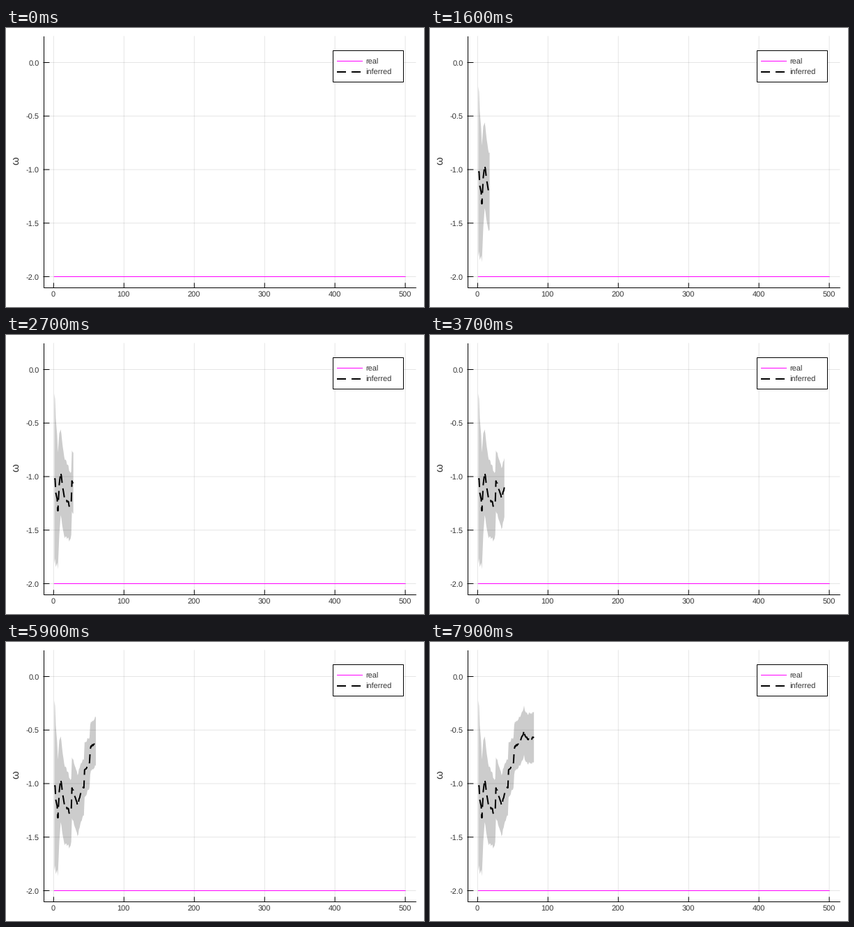
Animation of 600x400 px, one loop 8000 ms. Source, as a matplotlib script:

```python
import matplotlib.pyplot as plt
import numpy as np
from matplotlib.animation import FuncAnimation
from matplotlib.patches import Polygon, Rectangle

W, H, DPI = 600, 400, 100
PT = 72 / DPI
LEFT, RIGHT, TOP, BOTTOM = 53.9, 588, 12, 371.9
STEPS = 80

plt.rcParams["font.family"] = "Liberation Sans"
plt.rcParams["text.hinting"] = "none"


def sx(x):
    return 68.4 + 1.0094 * np.asarray(x)


def sy(y):
    return 49.5 - 153.5 * np.asarray(y)


# inferred mean: turning points joined by straight runs, plus a slight jitter
TURNS = [(1, -1.02), (2, -1.02), (3, -1.15), (5, -1.21), (6, -1.32),
         (8, -1.07), (10, -0.96), (15, -1.20), (21, -1.24), (22, -1.29),
         (25, -1.25), (26, -1.04), (30, -1.11), (34, -1.21), (39, -1.08),
         (43, -1.03), (44, -0.87), (51, -0.81), (52, -0.67), (62, -0.59),
         (66, -0.51), (69, -0.58), (80, -0.57)]
# half-width of the band, narrowing as steps come in
SPREAD = [(1, 0.795), (6, 0.545), (10, 0.40), (22, 0.33), (26, 0.285),
          (35, 0.285), (54, 0.225), (80, 0.235)]

steps = np.arange(1, STEPS + 1)
rng = np.random.default_rng(4)
jitter = np.where(steps > 10, rng.uniform(-0.015, 0.015, STEPS), 0)
mean = np.interp(steps, *zip(*TURNS)) + jitter
half = np.interp(steps, *zip(*SPREAD))

px = sx(steps)
mid, upper, lower = sy(mean), sy(mean + half), sy(mean - half)

fig = plt.figure(figsize=(W / DPI, H / DPI), dpi=DPI, facecolor="white")
ax = fig.add_axes([0, 0, 1, 1])
ax.set_xlim(0, W)
ax.set_ylim(H, 0)
ax.axis("off")


def line(xs, ys, color="black", width=1, z=2, **kw):
    return ax.plot(xs, ys, color=color, lw=width * PT, zorder=z, **kw)[0]


def label(x, y, text, size=11, ha="center", va="baseline", **kw):
    ax.text(x, y, text, fontsize=size * PT, ha=ha, va=va, color="#333333",
            zorder=6, **kw)


def dashed(xs, ys, z):
    return line(xs, ys, width=2, z=z, linestyle=(0, (6.5, 4)),
                dash_capstyle="butt", dash_joinstyle="round")


# grid, ticks and axes
GRID = dict(color=(0, 0, 0, 0.1), z=0, snap=False)
for v in range(0, 501, 100):
    x = sx(v)
    line([x, x], [TOP, BOTTOM], **GRID)
    line([x, x], [BOTTOM, BOTTOM - 6], snap=False)
    label(x - 0.5, 385, str(v))
for v in np.arange(0, -2.1, -0.5):
    y = sy(v)
    line([LEFT, RIGHT], [y, y], **GRID)
    line([LEFT, LEFT + 8], [y, y], snap=False)
    label(47.7, y + 4, f"{v:.1f}", ha="right")
line([LEFT, LEFT], [TOP, BOTTOM])
line([LEFT, RIGHT], [BOTTOM, BOTTOM])
label(14, 190, "ω", size=15, va="center", rotation=90)

# legend
ax.add_patch(Rectangle((468.9, 31.9), 101, 45, fc="white", ec="black",
                       lw=PT, zorder=4))
line([475, 511], [46.9, 46.9], "magenta", z=5)
dashed([475, 511], [63, 63], z=5)
label(516, 52, "real", ha="left")
label(516, 67, "inferred", ha="left")

# data
line(sx([1, 500]), sy([-2, -2]), "magenta", snap=False)
band = Polygon(np.zeros((3, 2)), fc=(0, 0, 0, 0.2), ec="none", lw=0, zorder=1)
ax.add_patch(band)
curve = dashed([], [], z=3)


def update(i):
    n = i + 1
    top = np.column_stack([px[:n], upper[:n]])
    base = np.column_stack([px[:n], lower[:n]])
    band.set_xy(np.vstack([top, base[::-1]]))
    curve.set_data(px[:n], mid[:n])
    for part in (band, curve):
        part.set_visible(n > 1)
    return band, curve


anim = FuncAnimation(fig, update, frames=STEPS, interval=100, repeat=True,
                     repeat_delay=0, init_func=lambda: update(0))
plt.show()
```
